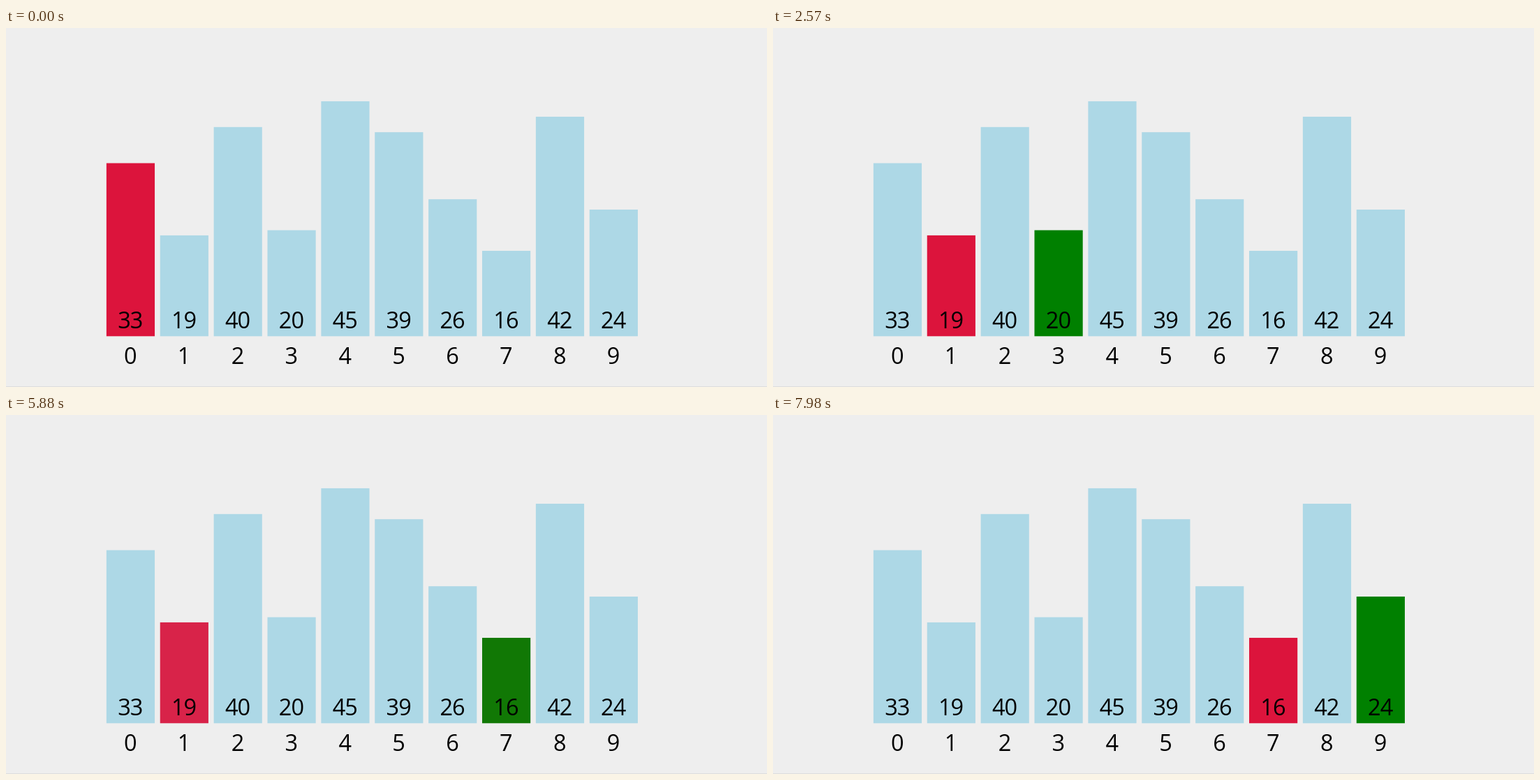
Animation, 1090 px wide and 514 px high, one loop 8000 ms. Source, as an HTML page:

```html
<!DOCTYPE html>
<html lang="en">
<head>
<meta charset="utf-8">
<title>Selection sort</title>
<style>
html, body { margin: 0; height: 100%; overflow: hidden; background: #eee; }
svg { display: block; width: 100vw; height: 100vh; }
text { font: 32.5px "Open Sans", "Noto Sans", sans-serif; letter-spacing: -1px; text-anchor: middle; }
</style>
</head>
<body>
<svg viewBox="0 0 1090 514"><rect y="513" width="1090" height="1" fill="#ddd"/></svg>
<script>
const LOOP = 8000, TICK = 67.6;               // ms per loop and per visible step
const DELAY = 162, PERIOD = 706.5, FADE = 250; // ms before, between and during fades
const BLUE = [173, 216, 230], GREEN = [0, 128, 0], RED = [220, 20, 60];
const values = [33, 19, 40, 20, 45, 39, 26, 16, 42, 24];

// One pass in search of the smallest value, as [smallest so far, bar being compared]
const states = [[0]];
for (let i = 1, min = 0; i < values.length; i++) {
  states.push([min, i]);
  if (values[i] < values[min]) states.push([min = i]);
}

const svg = document.querySelector("svg");
function add(tag, attrs, text = "") {
  const el = document.createElementNS("http://www.w3.org/2000/svg", tag);
  for (const name in attrs) el.setAttribute(name, attrs[name]);
  el.textContent = text;
  return svg.appendChild(el);
}

const pitch = 76.88, width = pitch * .9, base = 441.3;
const bars = values.map((value, i) => {
  const x = 143.85 + pitch * i, height = value * 96 / 13 + 4.1;
  const bar = add("rect", { x, y: base - height, width, height });
  const middle = x + width / 2 - .7;
  add("text", { x: middle, y: 429.5 }, value);
  add("text", { x: middle, y: 481 }, i);
  return bar;
});

const colour = ([min, scan], i) => i === min ? RED : i === scan ? GREEN : BLUE;
const ease = u => u < .5 ? 4 * u ** 3 : 1 - 4 * (1 - u) ** 3;
const clamp = (v, max) => Math.max(0, Math.min(max, v));

function draw(t) {
  const elapsed = Math.floor((t + 7) / TICK) * TICK - DELAY;
  const k = clamp(Math.floor(elapsed / PERIOD), states.length - 2);
  const p = ease(clamp((elapsed - k * PERIOD) / FADE, 1));
  bars.forEach((bar, i) => {
    const from = colour(states[k], i), to = colour(states[k + 1], i);
    const mix = from.map((c, j) => Math.round(c + (to[j] - c) * p));
    bar.setAttribute("fill", `rgb(${mix})`);
  });
}

const start = performance.now();
function frame() {
  draw((performance.now() - start) % LOOP);
  requestAnimationFrame(frame);
}
frame();
</script>
</body>
</html>
```
